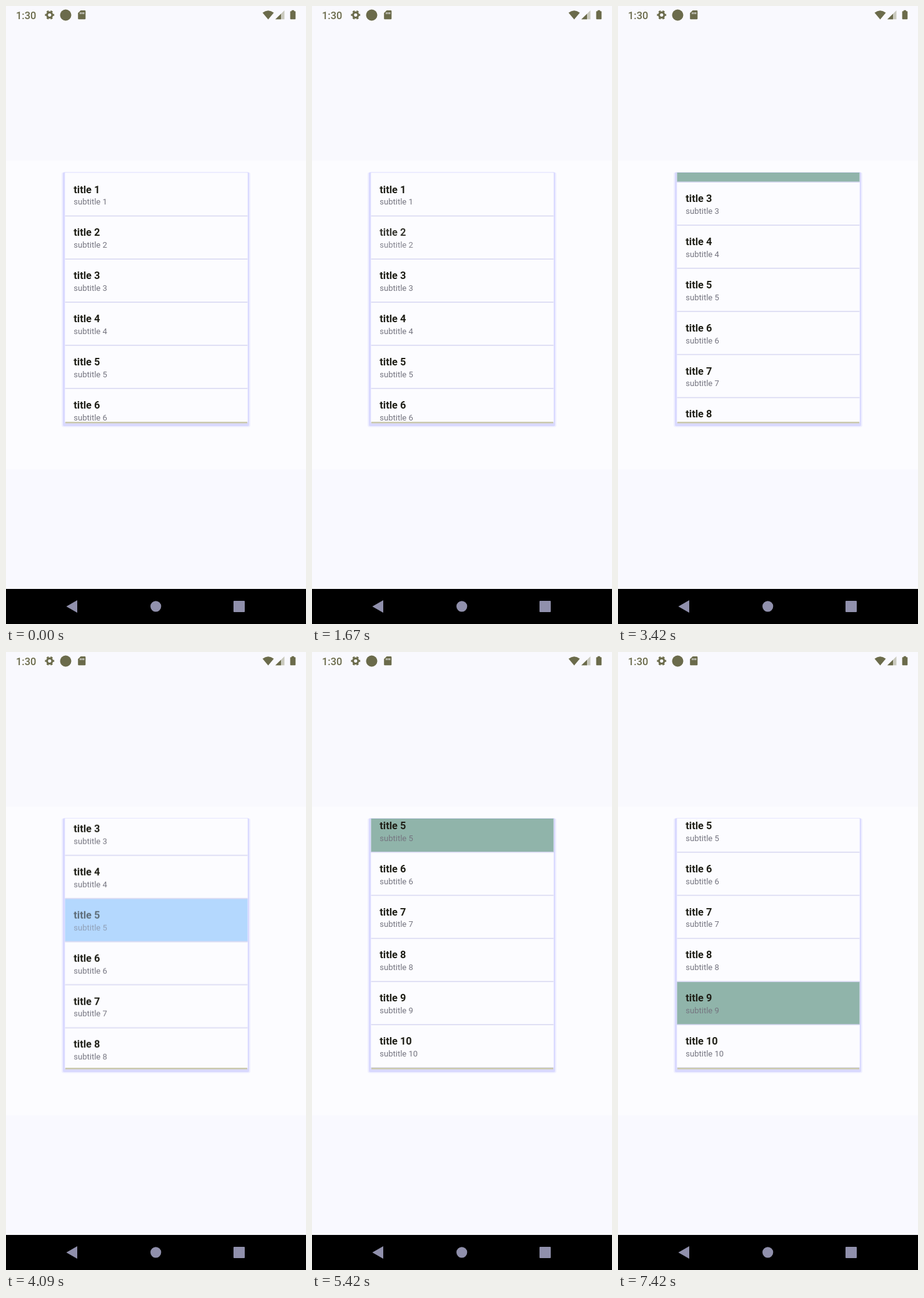
An HTML page that plays this animation: 480 px wide and 987 px high, repeating every 7.46 s.

```html
<!DOCTYPE html>
<html lang="en">
<head>
<meta charset="utf-8">
<title>Selectable list</title>
<style>
  html, body { margin: 0; width: 100%; height: 100%; overflow: hidden; background: #fcfcff; }
  svg { display: block; width: 100%; height: 100%; font-family: Roboto, "Noto Sans", sans-serif; }
  .title { font-size: 16.35px; font-weight: 700; fill: #202018; }
  .subtitle { font-size: 13px; fill: #757580; }
  .clock { font-size: 16.4px; font-weight: 500; }
  .status { fill: #6b6b4b; }
  .nav { fill: #9090ac; }
  .face { fill: #fcfcff; }
  .line { fill: #d9d9f2; }

  #list, .row .face, .row .label { animation: 7460ms linear infinite; }
  #list { animation-name: scroll; }
  .row2 .face { animation-name: fill2; }
  .row5 .face { animation-name: fill5; }
  .row9 .face { animation-name: fill9; }
  .row2 .label { animation-name: press2; }
  .row5 .label { animation-name: press5; }
  .row9 .label { animation-name: press9; }

  /* a drag, then a flick to the end of the list */
  @keyframes scroll {
    0%, 40.2% { transform: translateY(0); animation-timing-function: cubic-bezier(.35, 0, .3, 1); }
    49.9%, 57.1% { transform: translateY(-148.3px); animation-timing-function: cubic-bezier(.215, .61, .355, 1); }
    64.6%, 100% { transform: translateY(-291px); }
  }

  /* a released row fades into its selected colour; the next tap clears it */
  @keyframes fill2 {
    0%, 24.13% { fill: #fcfcff; }
    25.74% { fill: #b4d9ff; }
    26.27% { fill: #b3b6e2; }
    27.48%, 53.2% { fill: #90b4aa; }
    53.21%, 100% { fill: #fcfcff; }
  }
  @keyframes fill5 {
    0%, 53.21% { fill: #fcfcff; }
    54.83% { fill: #b4d9ff; }
    55.36% { fill: #b3b6e2; }
    56.57%, 77.2% { fill: #90b4aa; }
    77.21%, 100% { fill: #fcfcff; }
  }
  @keyframes fill9 {
    0%, 77.21% { fill: #fcfcff; }
    78.82% { fill: #b4d9ff; }
    79.36% { fill: #b3b6e2; }
    80.56%, 100% { fill: #90b4aa; }
  }

  @keyframes press2 {
    0%, 22.12% { opacity: 1; }
    24.13% { opacity: .2; animation-timing-function: ease-in-out; }
    27.48%, 100% { opacity: 1; }
  }
  @keyframes press5 {
    0%, 51.2% { opacity: 1; }
    53.21% { opacity: .2; animation-timing-function: ease-in-out; }
    56.57%, 100% { opacity: 1; }
  }
  @keyframes press9 {
    0%, 75.2% { opacity: 1; }
    77.21% { opacity: .2; animation-timing-function: ease-in-out; }
    80.56%, 100% { opacity: 1; }
  }
</style>
</head>
<body>
<svg viewBox="0 0 480 987" preserveAspectRatio="none">
  <defs>
    <clipPath id="window"><rect x="94.5" y="266.5" width="292" height="398"/></clipPath>
  </defs>

  <rect width="480" height="987" fill="#fcfcff"/>
  <rect width="480" height="247" fill="#f9f9fe"/>
  <rect y="740" width="480" height="191" fill="#f9f9ff"/>

  <g class="status">
    <text class="clock" x="16" y="20.5">1:30</text>
    <g fill="none" stroke="#6b6b4b">
      <circle cx="69.8" cy="14.3" r="4.2" stroke-width="3.2"/>
      <circle cx="69.8" cy="14.3" r="6.4" stroke-width="2" pathLength="12" stroke-dasharray="1" stroke-dashoffset=".5"/>
    </g>
    <circle cx="95.5" cy="14.5" r="9"/>
    <path d="M119.5 7H126q1.3 0 1.3 1.3V20q0 1.3-1.3 1.3H116.5q-1.3 0-1.3-1.3V11.3Z"/>
    <path d="M119 10v3M121.7 10v3M124.4 10v3" stroke="#f9f9fe" stroke-width="1.2"/>
    <path d="M410.5 10.8Q419.500 3.6 428.5 10.8L419.5 21.5Z"/>
    <path d="M431 21.3L445.5 7V21.3Z" fill="#c9c9bd"/>
    <path d="M431 21.3L440 12.4V21.3Z"/>
    <path d="M457 8.2V6.8H461V8.2H462.3Q463.3 8.2 463.3 9.2V20.3Q463.3 21.3 462.3 21.3H455.7Q454.7 21.3 454.7 20.3V9.2Q454.7 8.2 455.7 8.2Z"/>
  </g>

  <rect x="89" y="265.5" width="302" height="407" rx="3" fill="#f0f0ff"/>
  <rect x="91" y="265.5" width="298" height="405.5" rx="2" fill="#d9d9ff"/>
  <rect class="face" x="94.5" y="266.5" width="292" height="398"/>
  <g clip-path="url(#window)"><g id="list"></g></g>
  <rect x="95" y="664" width="291" height="2" fill="#cbc9ae"/>
  <rect x="95" y="666" width="291" height="1" fill="#d4d3d2"/>

  <rect y="931" width="480" height="56"/>
  <g class="nav">
    <path d="M96.5 959L114 949V969Z"/>
    <circle cx="239.7" cy="958.8" r="8.6"/>
    <rect x="364" y="950" width="18" height="18" rx="1"/>
  </g>
</svg>
<script>
  const listTop = 266.5, pitch = 68.85;

  function row(n) {
    const y = listTop + (n - 1) * pitch;
    return `<g class="row row${n}">
      <rect class="face" x="94.5" y="${y}" width="292" height="${pitch}"/>
      <g class="label">
        <text class="title" x="108.3" y="${y + 32}">title ${n}</text>
        <text class="subtitle" x="108.3" y="${y + 50.8}">subtitle ${n}</text>
      </g>
      <rect class="line" x="94.5" y="${y + pitch - 0.8}" width="292" height="1.6"/>
    </g>`;
  }

  // later rows go underneath so each divider stays whole
  document.getElementById("list").innerHTML =
    Array.from({ length: 10 }, (_, i) => row(10 - i)).join("");
</script>
</body>
</html>
```
